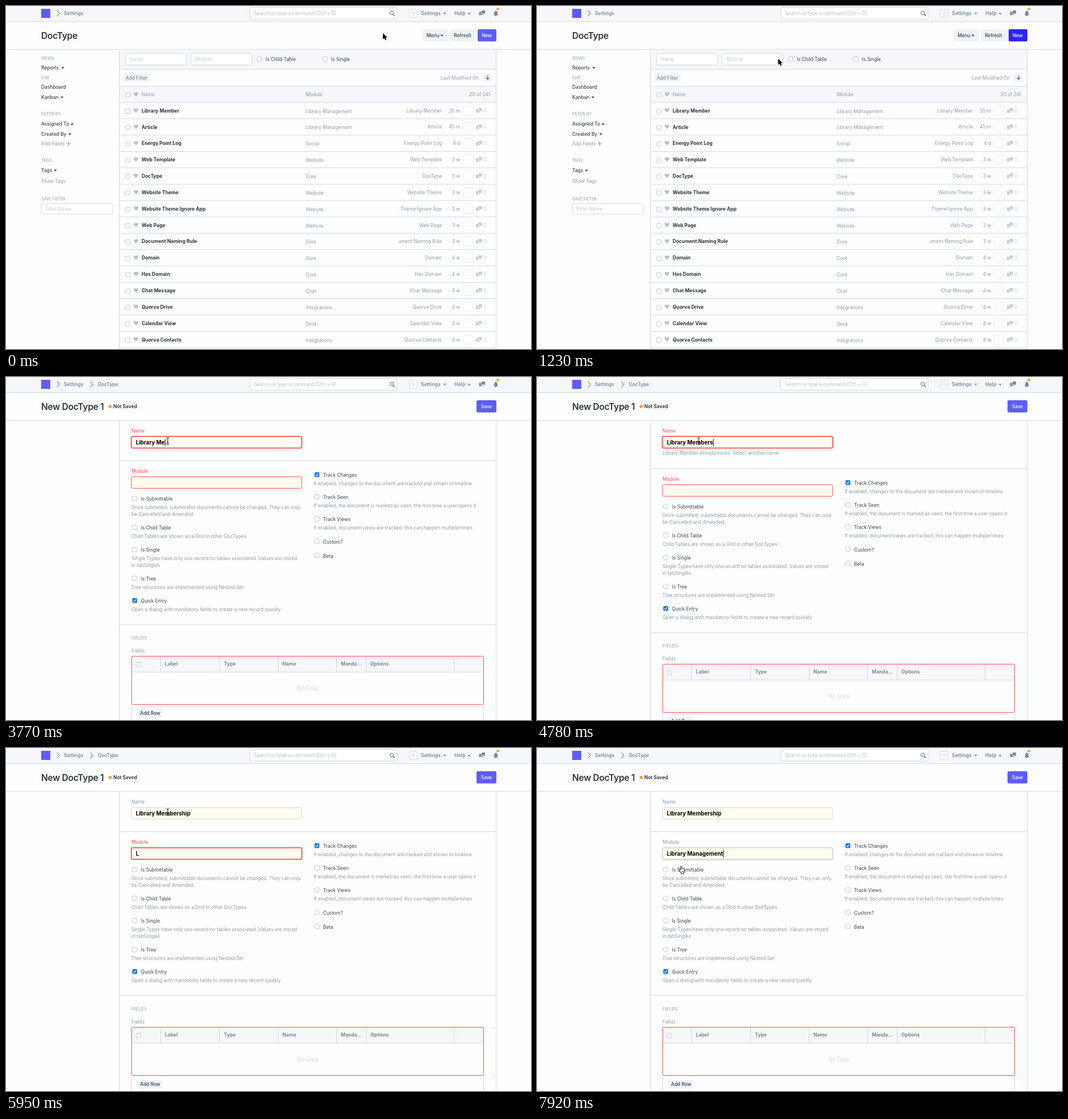
An HTML page for the animation above (8000 ms loop, 925x605 px).

```html
<!DOCTYPE html>
<html lang="en">
<head>
<meta charset="utf-8">
<title>New document form</title>
<style>
html, body { margin: 0; width: 100%; height: 100%; overflow: hidden; background: #fefefe; }
svg { display: block; width: 100%; height: 100%; }
text { font-family: Inter, "Liberation Sans", sans-serif; font-optical-sizing: none; white-space: pre; }
</style>
</head>
<body>
<svg id="stage" viewBox="0 0 925 605" xmlns="http://www.w3.org/2000/svg"></svg>
<script>
const DARK = '#36414c', MUTED = '#8d99a6', PALE = '#c3cad1', LINE = '#d1d8dd';
const PANEL = '#f5f7fa', BUTTON = '#eff3f6', BLUE = '#5e5cff', DEEP = '#2f22ff', RED = '#ff4d50', CREAM = '#fffdf0';

// y is the middle of the capitals
const text = (x, y, str, o = {}) => {
  const { size = 8.33, weight = 400, fill = MUTED, anchor = 'start', gap = 0, id = '' } = o;
  return `<text ${id && `id="${id}"`} x="${x}" y="${(y + size * 0.36).toFixed(2)}" font-size="${size}" font-weight="${weight}" fill="${fill}" text-anchor="${anchor}" letter-spacing="${gap}">${str}</text>`;
};
const box = (x, y, w, h, fill, stroke = 'none', r = 0, extra = '') =>
  `<rect x="${x}" y="${y}" width="${w}" height="${h}" rx="${r}" fill="${fill}" stroke="${stroke}" ${extra}/>`;
const path = (d, stroke, width = 1, fill = 'none', extra = '') =>
  `<path d="${d}" stroke="${stroke}" stroke-width="${width}" fill="${fill}" ${extra}/>`;
const hline = (x1, x2, y) => path(`M${x1} ${y}H${x2}`, LINE);
const vline = (x, y1, y2) => path(`M${x} ${y1}V${y2}`, LINE);
const caretDown = (x, y, fill = DARK) => path(`M${x - 2.8} ${y - 1.2}h5.6l-2.8 3z`, 'none', 0, fill);
const check = (x, y, on) => on
  ? box(x - 4.3, y - 4.3, 8.6, 8.6, '#0b79f5', 'none', 1.8) + path(`M${x - 2.2} ${y + 0.1}l1.6 1.9l2.8-4`, '#fff', 1.3)
  : box(x - 4, y - 4, 8, 8, '#fff', '#bcc2c8', 1.8, 'stroke-width=".9"');
const input = (x, y, w, h, hint) => box(x, y, w, h, '#fff', LINE, 2.5) + text(x + 7.7, y + h / 2, hint, { fill: PALE });
const button = (x, y, w, h, fill = BUTTON, id = '') => box(x, y, w, h, fill, 'none', 2.5, id && `id="${id}"`);
const chevron = x => path(`M${x - 2.5} 8l5 5l-5 5`, MUTED, 1.1);
const chat = (x, y, fill) =>
  path(`M${x - 1} ${y - 4}h6v5h-1v2l-2-2h-3z`, 'none', 0, fill) +
  path(`M${x - 5.5} ${y - 1.8}h4v3.8h3v1.6h-4l-2 2v-2h-1z`, 'none', 0, fill);
const heart = (x, y) =>
  path(`M${x} ${y + 4}l-3.7-3.9c-1.7-2.2 1.6-5.5 3.7-2.6c2.1-2.9 5.4 .4 3.7 2.6z`, 'none', 0, '#b9c2cb');

function navbar() {
  const bold = { size: 8.7, weight: 600, fill: '#7d8894' };
  return box(0, 0, 925, 27, PANEL) + hline(0, 925, 27.5) + hline(0, 925, 76.5) +
    box(62, 5, 16, 16, BLUE) + chevron(92) + text(102, 13, 'Settings', { ...bold, size: 8.6 }) +
    box(429.5, 2.5, 259.5, 20.5, '#fff', LINE, 2.5) +
    text(437, 13, 'Search or type a command (Ctrl + G)', { fill: '#b4bcc4' }) +
    `<circle cx="679.5" cy="12.2" r="3.2" fill="none" stroke="#59636e"/>` + path('M681.8 14.5l3.2 3.2', '#59636e', 1.3) +
    box(711, 6, 13, 14, '#fff', LINE, 2) + text(717.5, 13, 'A', { fill: PALE, anchor: 'middle' }) +
    text(731, 13, 'Settings', bold) + caretDown(773, 13, '#7d8894') +
    text(790, 13, 'Help', bold) + caretDown(816, 13.5, '#7d8894') +
    chat(839, 12, '#7d8894') +
    path('M859 16.2c1.6-1.5 1-6 2.5-7l1.6-.9l1.6 .9c1.5 1 .9 5.5 2.5 7z', 'none', 0, '#7d8894') +
    '<circle cx="863" cy="16.8" r="1.3" fill="#7d8894"/><circle cx="866.5" cy="5.2" r="2.3" fill="#ff9c0a"/>';
}

const title = str => text(62, 52, str, { size: 15.6, weight: 600, fill: '#2b343d', gap: -0.31 });

const ROWS = [
  ['Library Member', 'Library Management', '35 m'], ['Article', 'Library Management', '45 m'],
  ['Energy Point Log', 'Social', '4 d'], ['Web Template', 'Website', '3 w'], ['DocType', 'Core', '3 w'],
  ['Website Theme', 'Website', '3 w'], ['Website Theme Ignore App', 'Website', '3 w'], ['Web Page', 'Website', '3 w'],
  ['Document Naming Rule', 'Core', '3 w'], ['Domain', 'Core', '4 w'], ['Has Domain', 'Core', '4 w'],
  ['Chat Message', 'Chat', '4 w'], ['Quorva Drive', 'Integrations', '4 w'], ['Calendar View', 'Desk', '4 w'],
  ['Quorva Contacts', 'Integrations', '4 w']
];

function sidebar() {
  const head = (y, str) => text(62, y, str, { size: 7.05 });
  const item = (y, str, arrow) => text(62, y, str, { weight: 500, fill: DARK }) + (arrow ? caretDown(arrow, y + 0.5) : '');
  return head(92, 'VIEWS') + item(108.5, 'Reports', 100) + text(62, 126, 'List') + item(143, 'Dashboard') +
    item(160.5, 'Kanban', 98.5) + head(190.5, 'FILTER BY') + item(208, 'Assigned To', 116.5) +
    item(225.5, 'Created By', 112.5) + text(62, 243, 'Add Fields') + path('M107 243h7M110.5 239.5v7', MUTED, 1.2) +
    head(272.5, 'TAGS') + item(289.5, 'Tags', 87) + text(62, 309, 'Show Tags') + head(340, 'SAVE FILTER') +
    input(62, 348.8, 126, 18, 'Filter Name');
}

function listPage() {
  const dark = { weight: 500, fill: DARK };
  let s = title('DocType') + button(734, 41, 44.5, 21.5) + text(741, 52, 'Menu', dark) + caretDown(768, 52) +
    button(782, 41, 45.5, 21.5) + text(789, 52, 'Refresh', dark) +
    button(831, 41, 33, 21.5, BLUE, 'newBtn') + text(838, 52, 'New', { weight: 500, fill: '#fff' }) + sidebar() +
    box(200, 77, 663, 34, PANEL) + box(200, 142, 663, 28, PANEL) + hline(200, 863, 111.5) + hline(200, 863, 141.5) +
    input(210.5, 83.5, 108, 20.5, 'Name') + input(326, 83.5, 107.5, 20.5, 'Module') +
    check(446.8, 93.3) + text(457.7, 94, 'Is Child Table', { fill: DARK }) +
    check(562, 93.3) + text(572.7, 94, 'Is Single', { fill: DARK }) +
    button(207, 118.5, 46.5, 15.5) + text(211, 127, 'Add Filter', { fill: '#727d88' }) +
    text(833, 127, 'Last Modified On', { anchor: 'end' }) + button(841, 119, 15, 15) +
    path('M848.5 122.5v7M845.5 126.5l3 3l3-3', '#727d88', 1.5) +
    check(214.7, 156.8) + heart(229, 156) + text(239, 156.3, 'Name') + text(528, 156.3, 'Module') +
    text(853, 156.3, '20 of 241', { anchor: 'end' }) + hline(200, 863, 170);
  ROWS.forEach(([name, module, age], i) => {
    const y = 184.6 + 28.85 * i;
    s += check(214.7, y + 1) + heart(229, y - 0.5) + text(239, y, name, { size: 8.5, weight: 700, fill: '#2b343d' }) +
      text(528, y + 1, module) + `<g clip-path="url(#idClip)">${text(768, y, name, { anchor: 'end' })}</g>` +
      text(800, y, age, { anchor: 'end' }) +
      box(805.8, y - 8.3, 16.4, 16.4, 'none', LINE, 3, 'stroke-dasharray="1.6 1.4" stroke-width=".9"') +
      chat(833.5, y - 0.5, '#c5cdd4') + text(841.3, y, '0', { fill: PALE }) + hline(200, 863, y + 14.3);
  });
  return s;
}

function formPage() {
  const dark = { weight: 400, fill: DARK };
  const typed = { size: 9.75, weight: 700, fill: '#000' };
  const field = (x, y, str, help, on) => check(x + 5.8, y - 0.7, on) + text(x + 16.8, y, str, dark) +
    help.map((h, i) => text(x, y + 15 + 12 * i, h)).join('');
  const entry = (key, y) => text(221, y - 19.8, key === 'name' ? 'Name' : 'Module', { id: key + 'Label' }) +
    box(221, y - 10, 300, 20.3, CREAM, RED, 2.5, `id="${key}Box"`) + text(228.7, y + 0.5, '', { ...typed, id: key + 'Text' }) +
    box(0, y - 5.5, 1, 12, '#000', 'none', 0, `id="${key}Caret"`);
  const head = [[280, 'Label'], [384, 'Type'], [487, 'Name'], [590, 'Manda...'], [642, 'Options']];
  return title('New DocType 1') + '<circle cx="183.5" cy="52" r="2.8" fill="#ff9c0a"/>' +
    text(189, 52, 'Not Saved', { size: 8.4, weight: 700, fill: DARK }) +
    button(829, 41, 35, 21.5, BLUE) + text(846.5, 52, 'Save', { weight: 500, fill: '#fff', anchor: 'middle' }) +
    chevron(151) + text(162, 13, 'DocType', { size: 8.4, weight: 600, fill: '#7d8894' }) +
    entry('name', 115) +
    `<g id="exists">${text(221, 134, 'Library Member already exists. Select another name')}</g><g id="lower">` +
    hline(200, 863, 147.5) + entry('module', 186) +
    field(221, 215, 'Is Submittable', ['Once submitted, submittable documents cannot be changed. They can only', 'be Cancelled and Amended.']) +
    field(221, 266, 'Is Child Table', ['Child Tables are shown as a Grid in other DocTypes']) +
    field(221, 305, 'Is Single', ['Single Types have only one record no tables associated. Values are stored', 'in tabSingles']) +
    field(221, 356, 'Is Tree', ['Tree structures are implemented using Nested Set']) +
    field(221, 395, 'Quick Entry', ['Open a dialog with mandatory fields to create a new record quickly'], true) +
    field(542, 173, 'Track Changes', ['If enabled, changes to the document are tracked and shown in timeline'], true) +
    field(542, 212, 'Track Seen', ['If enabled, the document is marked as seen, the first time a user opens it']) +
    field(542, 251, 'Track Views', ['If enabled, document views are tracked, this can happen multiple times']) +
    field(542, 290.5, 'Custom?', []) + field(542, 315.5, 'Beta', []) + hline(200, 863, 436.8) +
    text(221, 460.5, 'FIELDS', { size: 7.6, gap: 0.3 }) + text(221, 483, 'Fields') +
    vline(221.5, 577, 605) + vline(841.5, 577, 605) +
    box(222, 493, 619, 27.5, PANEL) + hline(222, 841, 520.5) +
    [272.5, 376.5, 479.5, 582.5, 634.5, 789.5].map(x => vline(x, 493, 520)).join('') + check(233.2, 507) +
    head.map(([x, str]) => text(x, 506.3, str, { size: 8.5, weight: 700, fill: '#7d8894' })).join('') +
    text(531.5, 549.5, 'No Data', { size: 9.7, fill: '#d1d8dd', anchor: 'middle' }) +
    box(221.5, 492.5, 620, 85, 'none', RED, 2) +
    button(232, 585.5, 43, 15.5) + text(236.3, 593, 'Add Row', { weight: 500, fill: DARK }) + '</g>' +
    '<g id="menu">' + box(221, 197, 300, 84, '#fff', LINE, 2.5, 'filter="url(#shade)"') + box(221.5, 197.5, 299, 27.5, '#f0f4f7') +
    text(229, 211, 'Library Management', { weight: 700, fill: DARK, size: 8.5 }) +
    path('M229 239.5h6M232 236.5v6', DARK, 1.2) + text(239, 239.5, 'Create a new Module Def', dark) +
    '<circle cx="231.5" cy="266.5" r="2.5" fill="none" stroke="#36414c"/>' + path('M233.4 268.4l2.2 2.2', DARK, 1.2) +
    text(239, 267, 'Advanced Search', dark) + '</g>';
}

const POINTERS =
  `<g id="arrow">${path('M0 0v10.8l2.5-2.3l1.8 4.1l1.9-.8l-1.8-4h3.5z', '#fff', 1, '#000', 'paint-order="stroke"')}</g>` +
  `<g id="beam">${path('M-2.4-6q2.4 0 2.4 1.6v9q0 1.6-2.4 1.6M2.4-6q-2.4 0-2.4 1.6M0 4.6q0 1.6 2.4 1.6M-1.3 2.4h2.6', '#111', 1)}</g>` +
  `<g id="hand">${path('M-1.2-5.5c0-1.5 2-1.5 2 0v3.2c.6-.8 1.8-.5 1.9 .3c.6-.6 1.7-.3 1.8 .5c.8-.5 1.6 0 1.6 1c0 3-.3 4.2-1.3 5.4v1.5h-5.2v-1.4l-3.3-4.2c-.8-1.4 .7-2.2 1.6-1.3l.9 1z', '#111', 1, '#fff')}${path('M1 1.5v2.6M2.6 1.5v2.6M4.2 1.5v2.6', '#111', 0.6)}</g>`;

document.getElementById('stage').innerHTML =
  `<defs><clipPath id="idClip"><rect x="692" y="170" width="90" height="435"/></clipPath>
  <filter id="glow" x="-5%" y="-50%" width="110%" height="200%"><feDropShadow dx="0" dy="0" stdDeviation="1.6" flood-color="#ff4d50" flood-opacity=".5"/></filter>
  <filter id="shade" x="-5%" y="-20%" width="110%" height="150%"><feDropShadow dx="0" dy="1" stdDeviation="1.2" flood-opacity=".14"/></filter></defs>` +
  box(0, 0, 925, 605, '#fefefe') + navbar() + `<g id="list">${listPage()}</g><g id="form">${formPage()}</g>` +
  vline(199.5, 77, 605) + vline(863.5, 77, 605) + POINTERS;

const el = id => document.getElementById(id);
const show = (id, on) => { el(id).style.display = on ? '' : 'none'; };
const at = (steps, t) => steps.reduce((found, step) => (step[0] <= t ? step : found), steps[0]);

const pen = document.createElement('canvas').getContext('2d');
const widthOf = str => {
  pen.font = '700 97.5px Inter, "Liberation Sans", sans-serif';
  return pen.measureText(str).width / 10;
};

// time, pointer, x, y
const MOVES = [
  [0, 'arrow', 664, 48], [240, 'arrow', 685, 49], [390, 'arrow', 738, 52], [500, 'arrow', 796, 55],
  [600, 'hand', 838, 60], [710, 'hand', 846, 61], [1030, 'arrow', 720, 66], [1120, 'arrow', 572, 74.5],
  [1230, 'arrow', 425, 93], [1340, 'arrow', 330, 107], [1450, 'beam', 292, 112], [1560, 'beam', 285, 113],
  [7130, 'arrow', 215, 150], [7240, 'arrow', 130, 190], [7350, 'arrow', 92, 207], [7460, 'arrow', 150, 214],
  [7570, 'hand', 225, 216], [7680, 'hand', 254, 215]
];
// time, letters typed
const NAME = 'Library Membership', MODULE = 'Library Management';
const NAME_KEYS = [[0, 0], [2100, 1], [2310, 2], [2430, 3], [2670, 5], [2910, 6], [3030, 8], [3530, 9], [3770, 10],
  [3880, 11], [3990, 12], [4310, 13], [4430, 14], [4660, 15], [4900, 16], [5020, 17], [5140, 18]];
const MODULE_KEYS = [[0, 0], [5950, 1], [6070, 2], [6190, 3], [7800, 18]];
// time, field holding the visible caret
const CARETS = [[0, ''], [1680, 'name'], [3440, ''], [3530, 'name'], [5380, ''], [5500, 'module'], [5950, ''],
  [6070, 'module'], [6540, ''], [7920, 'module']];

function drawField(key, str, focus, required, caret) {
  const frame = el(key + 'Box');
  el(key + 'Label').setAttribute('fill', required ? RED : MUTED);
  frame.setAttribute('stroke', required ? RED : focus ? '#b7bdc0' : LINE);
  frame.setAttribute('stroke-width', focus && required ? 1.6 : 1);
  frame.setAttribute('filter', focus ? `url(#${required ? 'glow' : 'shade'})` : 'none');
  el(key + 'Text').textContent = str;
  el(key + 'Caret').setAttribute('x', 228.9 + widthOf(str));
  show(key + 'Caret', caret === key);
}

function render(t) {
  const form = t >= 1340, taken = t >= 4550 && t < 5020;
  show('list', !form);
  show('form', form);
  el('newBtn').setAttribute('fill', t >= 600 ? DEEP : BLUE);
  const caret = at(CARETS, t)[1];
  drawField('name', NAME.slice(0, at(NAME_KEYS, t)[1]), t >= 1450 && t < 5380, t < 5380, caret);
  drawField('module', MODULE.slice(0, at(MODULE_KEYS, t)[1]), t >= 5380, t < 7800, caret);
  show('exists', taken);
  el('lower').setAttribute('transform', `translate(0 ${taken ? 14 : 0})`);
  show('menu', t >= 6780 && t < 7800);
  const [, kind, x, y] = at(MOVES, t);
  for (const id of ['arrow', 'beam', 'hand']) show(id, id === kind);
  el(kind).setAttribute('transform', `translate(${x} ${y})`);
}

const start = performance.now();
function tick() {
  render((performance.now() - start) % 8000);
  requestAnimationFrame(tick);
}
tick();
</script>
</body>
</html>
```
